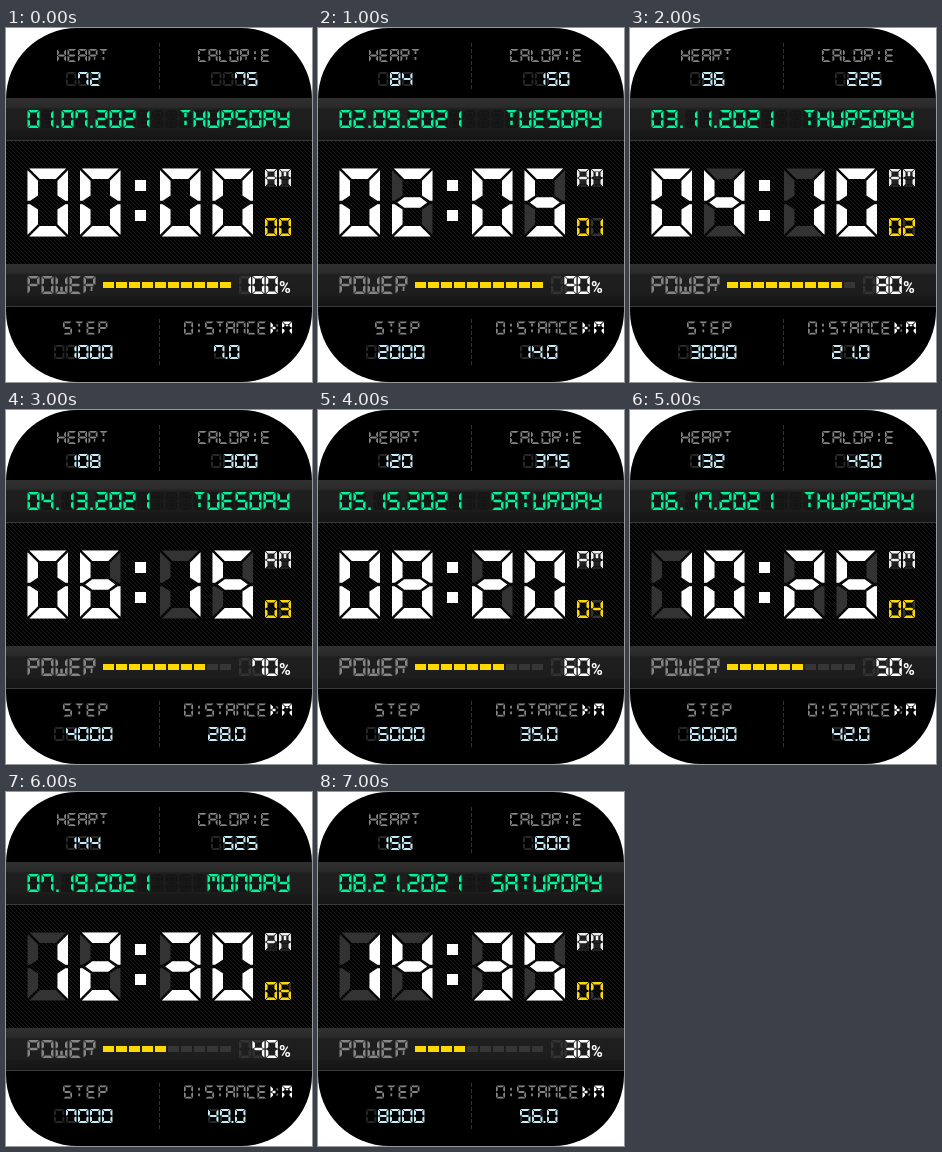
Write an HTML page with a canvas that moves like this. It is 306 by 354 pixels and loops after 8000 ms.

```html
<!DOCTYPE html>
<html lang="en">
<head>
<meta charset="utf-8">
<style>
html, body { margin: 0; width: 306px; height: 354px; overflow: hidden; background: #fff; }
canvas { display: block; border-radius: 71px; }
</style>
</head>
<body>
<canvas id="face" width="306" height="354"></canvas>
<script>
const ctx = document.getElementById('face').getContext('2d');

// Segments: a-f ring, g/n middle halves, i/l centre bars, h/j/k/m diagonals.
const GLYPHS = {
  0: 'abcdef', 1: 'bc', 2: 'abgned', 3: 'abgncd', 4: 'fgnbc', 5: 'afgncd',
  6: 'afgnedc', 7: 'fabc', 8: 'abcdefgn', 9: 'abcdfgn',
  A: 'abcefgn', C: 'adef', D: 'abcdef', E: 'adefgn', H: 'bcefgn', I: 'il',
  K: 'efgjm', L: 'def', M: 'abcefi', N: 'abcef', O: 'abcdef', P: 'abefgn',
  R: 'abefgnm', S: 'acdfgn', T: 'ail', U: 'bcdef', W: 'bcdefl', Y: 'bcdfgn',
  '*': 'abcdefgnhijklm'
};

const BIG = { w: 40.5, h: 68, t: 10.5, gap: 1.8, pitch: 52.5 };
const MEDIUM = { w: 12, h: 18, t: 2.5, gap: 0.6, pitch: 14, dot: 6 };
const PERCENT = { ...MEDIUM, pitch: 13.4 };
const SMALL = { w: 10.4, h: 14, t: 2, gap: 0.5, pitch: 12, dot: 3 };
const LABEL = { w: 9, h: 13, t: 1.8, gap: 0.5, pitch: 10.5 };
const STEP = { ...LABEL, pitch: 11.8 };
const UNIT = { ...LABEL, w: 10, t: 2.5, pitch: 11.5 };

const GREY = '#858585', ICE = '#c4ebf8', WHITE = '#fff', GREEN = '#00f596', YELLOW = '#ffd800';
const UNLIT = '#333', SHADOW = '#151515';

function segments({ w, h, t, gap: g }) {
  const mid = h / 2, cx = w / 2, half = t / 2;
  const flipX = pts => pts.map(([x, y]) => [w - x, y]);
  const flipY = pts => pts.map(([x, y]) => [x, h - y]);
  const a = [[g, 0], [w - g, 0], [w - t - g, t], [t + g, t]];
  const f = [[0, g], [t, t + g], [t, mid - half - g], [t * .25, mid - g], [0, mid - g]];
  const bar = [[half, mid], [t + g, mid - half], [cx, mid - half], [cx, mid + half], [t + g, mid + half]];
  const i = [[cx - half, t + g], [cx + half, t + g], [cx + half, mid - half - g], [cx - half, mid - half - g]];
  const left = t + g, right = cx - half, top = t + g, low = mid - half - g, d = t * .8;
  const diag = [[left, top], [left + d, top], [right, low - d], [right, low], [right - d, low], [left, top + d]];
  return {
    a, d: flipY(a), f, e: flipY(f), b: flipX(f), c: flipX(flipY(f)),
    g: bar, n: flipX(bar), i, l: flipY(i),
    h: diag, j: flipX(diag), k: flipY(diag), m: flipX(flipY(diag))
  };
}

function glyph(char, x, y, font, color) {
  const shapes = font.shapes ||= segments(font);
  ctx.fillStyle = color;
  ctx.beginPath();
  for (const name of GLYPHS[char] || '') {
    shapes[name].forEach(([px, py], n) => ctx[n ? 'lineTo' : 'moveTo'](x + px, y + py));
    ctx.closePath();
  }
  ctx.fill();
}

// A space shows only the unlit segments.
function write(text, x, y, font, color, ghost, ghostColor = '#272727') {
  for (const char of text) {
    if (char === '.') {
      ctx.fillStyle = color;
      ctx.fillRect(x + font.dot / 2 - font.t / 2 - 1, y + font.h - font.t, font.t, font.t);
      x += font.dot;
      continue;
    }
    if (ghost) glyph(ghost, x, y, font, ghostColor);
    glyph(char, x, y, font, color);
    x += font.pitch;
  }
}

function rect(color, x, y, w, h) {
  ctx.fillStyle = color;
  ctx.fillRect(x, y, w, h);
}

function band(y) {
  const shade = ctx.createLinearGradient(0, y, 0, y + 42);
  [[0, '#303030'], [.22, '#2a2a2a'], [.26, '#1f1f1f'], [.74, '#1d1d1d'], [.78, '#191919'], [1, '#151515']]
    .forEach(stop => shade.addColorStop(...stop));
  rect(shade, 0, y, 306, 42);
}

function background() {
  rect('#000', 0, 0, 306, 354);
  ctx.save();
  ctx.beginPath();
  ctx.rect(0, 112, 306, 124);
  ctx.clip();
  ctx.strokeStyle = '#1b1b1b';
  ctx.lineWidth = 1;
  ctx.beginPath();
  for (let x = -124; x < 306; x += 4) {
    ctx.moveTo(x, 112);
    ctx.lineTo(x + 124, 236);
  }
  ctx.stroke();
  ctx.restore();
  for (const y of [70, 236]) {
    band(y);
    rect('#3a3a3a', 0, y + 42, 306, 1);
  }
  for (const top of [15, 291])
    for (let y = top; y < top + 46; y += 6) rect('#333', 153, y, 1, 4);
}

function draw(step) {
  const date = new Date(2021, step, 7 + 2 * step);
  const two = n => String(n).padStart(2, '0');
  const day = date.toLocaleDateString('en-US', { weekday: 'long' }).toUpperCase();
  const power = 100 - step * 10;
  const distance = `${7 * (step + 1)}.0`;

  background();

  write('HEART', 51, 21, LABEL, GREY);
  write('CALORIE', 192, 21, LABEL, GREY);
  write(String(72 + step * 12).padStart(3), 60, 44, SMALL, ICE, '0');
  write(String(75 + step * 75).padStart(4), 205, 44, SMALL, ICE, '0');

  write(`${two(step + 1)}.${two(date.getDate())}.2021`, 21.5, 82, MEDIUM, GREEN, '*', SHADOW);
  write(day.padStart(10), 145.5, 82, MEDIUM, GREEN, '*', SHADOW);

  write(two(step * 2), 21.5, 140.5, BIG, WHITE, '0', UNLIT);
  write(two(step * 5), 154, 140.5, BIG, WHITE, '0', UNLIT);
  rect(WHITE, 129, 152, 11, 11);
  rect(WHITE, 129, 182, 11, 11);
  write(step < 6 ? 'AM' : 'PM', 259, 141, MEDIUM, '#eee', '*', '#222');
  write(two(step), 259, 190, MEDIUM, YELLOW, '0', UNLIT);

  write('POWER', 21.5, 248, MEDIUM, GREY);
  for (let n = 0; n < 10; n++)
    rect(n <= power / 10 ? YELLOW : '#363636', 97 + n * 13, 254, 11, 6);
  write(String(power).padStart(3), 233, 248, PERCENT, WHITE, '0', UNLIT);
  ctx.fillStyle = WHITE;
  ctx.font = 'bold 16px Roboto, sans-serif';
  ctx.fillText('%', 273, 265);

  write('STEP', 57, 293.5, STEP, GREY);
  write('DISTANCE', 178, 293.5, LABEL, GREY);
  write('KM', 264.5, 293.5, UNIT, WHITE);
  write(String(1000 * (step + 1)).padStart(5), 48, 317, SMALL, ICE, '0');
  write(distance, distance.length > 3 ? 202 : 208, 317, SMALL, ICE, '0');
}

function tick() {
  draw(Math.floor(performance.now() % 8000 / 1000));
  requestAnimationFrame(tick);
}
tick();
</script>
</body>
</html>
```
